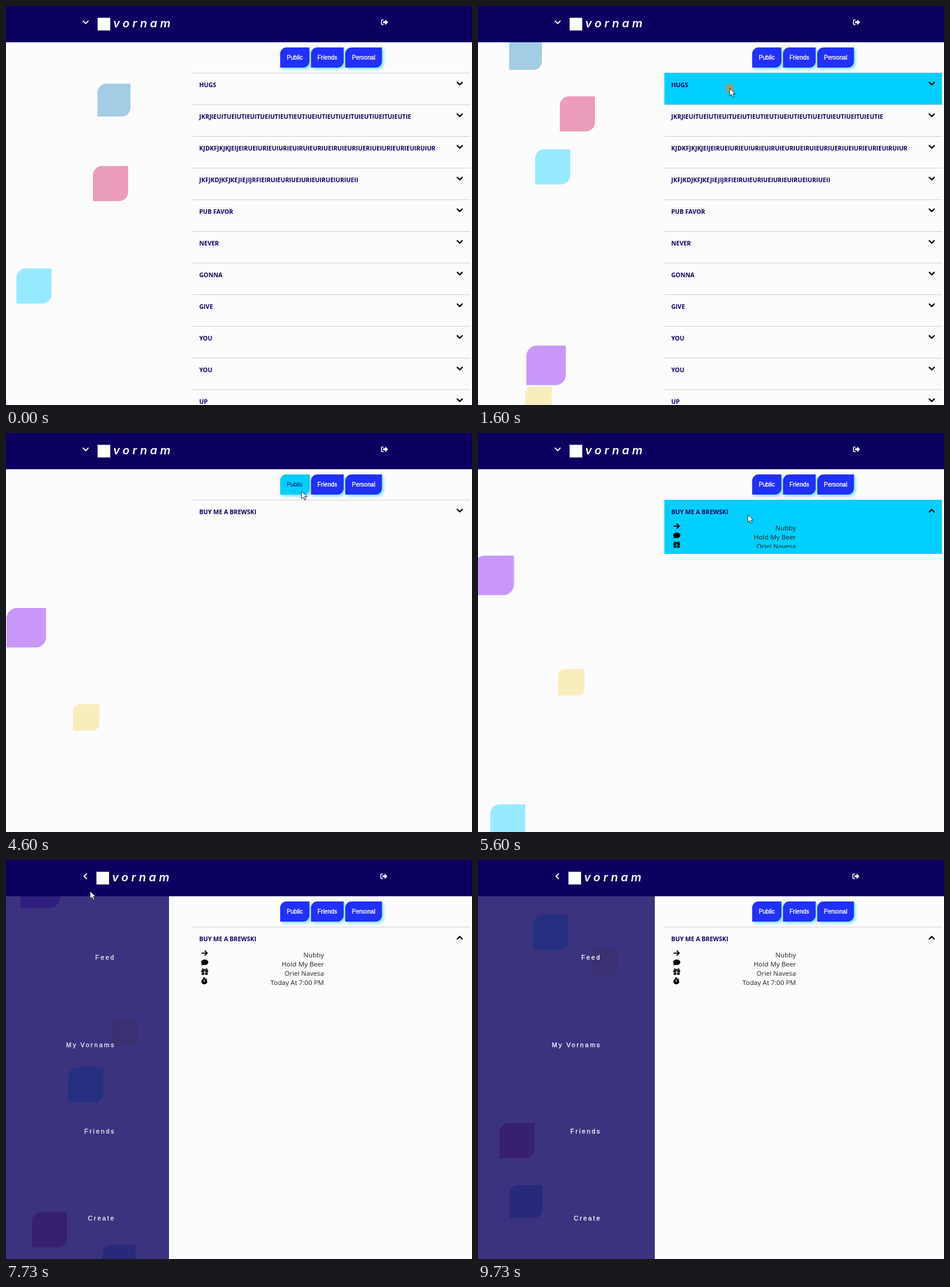
Animation of 809x693 px, one loop 9790 ms. Source, as an HTML page:

```html
<!DOCTYPE html>
<html lang="en">
<head>
<meta charset="utf-8">
<title>Favor feed</title>
<style>
html, body { margin: 0; width: 100%; height: 100%; overflow: hidden; background: #fcfcfc; }
svg { display: block; width: 809px; height: 693px; }
text { white-space: pre; }
.row text { font: 700 10.5px "Open Sans", "Noto Sans", sans-serif; fill: #0b0060; }
.row .line { fill: #cfcfcf; }
.chev { fill: none; stroke: #000; stroke-width: 2.2; stroke-linecap: round; stroke-linejoin: round; }
.white { stroke: #fff; stroke-width: 2; }
.info text { font: 11.6px "Open Sans", "Noto Sans", sans-serif; fill: #222; text-anchor: end; }
.btn text { font: 10.25px "Liberation Sans", Arial, sans-serif; fill: #fff; stroke: #fff; stroke-width: .35px; }
.btn { filter: drop-shadow(3px 3px 2px #7de4ff); }
.btn .hot text { fill: #0b0060; stroke: none; }
.nav text { font: 11px "Liberation Sans", Arial, sans-serif; letter-spacing: 2.45px; fill: #fff; stroke: #fff; stroke-width: .3px; text-anchor: end; }
.brand { font: italic 600 20px Inter, sans-serif; letter-spacing: 5px; fill: #fff; }
.hot { opacity: 0; }

[class*="t-"] { animation: 9.79s linear infinite; }
.t-blue { animation-name: blue; }
.t-pink { animation-name: pink; }
.t-cyan { animation-name: cyan; }
.t-violet { animation-name: violet; }
.t-sand { animation-name: sand; }
.t-hugs { animation-name: hugs; }
.t-public { animation-name: public; }
.t-friends { animation-name: friends; }
.t-drink { animation-name: drink; }
.t-info { animation-name: info; }
.t-menu { animation-name: menu; }
.t-fade { animation-name: fade; }
.t-pointer { animation-name: pointer; animation-timing-function: ease-in-out; }
.t-click { animation-name: click; }
.t-feed { animation-name: feed; }
.t-mine { animation-name: mine; }
.t-shut { animation-name: shut; }
.t-open { animation-name: open; }
.t-down { animation-name: down; }
.t-left { animation-name: left; }
.t-nudge { animation-name: nudge; }
.t-nudge1 { animation-name: nudge1; }

/* floating leaves */
@keyframes blue {
  0% { transform: translate(159px, 135px); }
  8% { transform: translate(104px, 95px); }
  16.34% { transform: translate(54px, 54px); }
  22% { transform: translate(56px, 26px); }
  30% { transform: translate(70px, -14px); }
  30.01%, 71.6% { transform: translate(205px, 705px); }
  78.96% { transform: translate(168px, 668px); }
  89% { transform: translate(108px, 617px); }
  99.39%, 100% { transform: translate(55px, 565px); }
}
@keyframes pink {
  0% { transform: translate(151px, 278px); }
  16.34% { transform: translate(142px, 157px); }
  29.93% { transform: translate(125px, 52px); }
  40% { transform: translate(105px, -25px); }
  40.01%, 66.8% { transform: translate(61px, 705px); }
  68.74% { transform: translate(57px, 690px); }
  78.96% { transform: translate(45px, 612px); }
  89% { transform: translate(38px, 535px); }
  99.39% { transform: translate(37px, 457px); }
  100% { transform: translate(37px, 452px); }
}
@keyframes cyan {
  0% { transform: translate(18px, 456px); }
  4% { transform: translate(13px, 405px); }
  10% { transform: translate(47px, 329px); }
  16.34% { transform: translate(99px, 249px); }
  22% { transform: translate(120px, 174px); }
  29.93% { transform: translate(126px, 69px); }
  40% { transform: translate(128px, -66px); }
  40.01%, 52.6% { transform: translate(20px, 705px); }
  60% { transform: translate(22px, 609px); }
  68.74% { transform: translate(46px, 495px); }
  78.96% { transform: translate(108px, 360px); }
  88% { transform: translate(120px, 243px); }
  99.39% { transform: translate(96px, 95px); }
  100% { transform: translate(95px, 87px); }
}
@keyframes violet {
  0%, 3.93% { transform: translate(120px, 705px); }
  16.34% { transform: translate(84px, 590px); }
  29.93% { transform: translate(42px, 464px); }
  40% { transform: translate(10px, 369px); }
  46.99% { transform: translate(1px, 304px); }
  58% { transform: translate(-7px, 206px); }
  68.74% { transform: translate(2px, 109px); }
  78.96% { transform: translate(25px, 15px); }
  85%, 100% { transform: translate(40px, -41px); }
}
@keyframes sand {
  0%, 9.2% { transform: translate(83px, 705px); }
  16.34% { transform: translate(82px, 661px); }
  29.93% { transform: translate(88px, 577px); }
  46.99% { transform: translate(116px, 471px); }
  68.74% { transform: translate(165px, 341px); }
  78.96% { transform: translate(183px, 277px); }
  99.39% { transform: translate(196px, 154px); }
  100% { transform: translate(196px, 150px); }
}

/* hover and list states */
@keyframes hugs { 0%, 9.5%, 21.5%, 100% { opacity: 0; } 10.5%, 20% { opacity: 1; } }
@keyframes public { 0%, 23%, 31.5%, 45%, 51%, 100% { opacity: 0; } 24%, 30.5%, 46.5%, 50% { opacity: 1; } }
@keyframes friends { 0%, 30.5%, 46%, 100% { opacity: 0; } 31.5%, 45% { opacity: 1; } }
@keyframes drink {
  0%, 50.5% { opacity: 0; height: 55px; }
  51.5%, 55.5% { opacity: 1; height: 55px; }
  58%, 60% { opacity: 1; height: 112px; }
  61%, 100% { opacity: 0; height: 112px; }
}
@keyframes info { 0%, 55.5% { clip-path: inset(0 0 100% 0); } 58%, 100% { clip-path: inset(0 0 0 0); } }
@keyframes feed { 0%, 36% { visibility: visible; } 36.01%, 100% { visibility: hidden; } }
@keyframes mine { 0%, 36% { visibility: hidden; } 36.01%, 100% { visibility: visible; } }
@keyframes shut { 0%, 55.5% { opacity: 1; } 55.51%, 100% { opacity: 0; } }
@keyframes open { 0%, 55.5% { opacity: 0; } 55.51%, 100% { opacity: 1; } }

/* side menu and header */
@keyframes menu {
  0% { transform: translate(-307px, 0); }
  75.6% { transform: translate(-307px, 0); animation-timing-function: ease; }
  80.7%, 100% { transform: translate(0, 0); }
}
@keyframes fade {
  0% { opacity: 0; }
  75.6% { opacity: 0; animation-timing-function: ease; }
  80.7%, 100% { opacity: 1; }
}
@keyframes down { 0%, 75.6% { opacity: 1; } 75.61%, 100% { opacity: 0; } }
@keyframes left { 0%, 75.6% { opacity: 0; } 75.61%, 100% { opacity: 1; } }
@keyframes nudge { 0%, 75.6% { transform: translate(0, 0); } 75.61%, 100% { transform: translate(-2px, 0); } }
@keyframes nudge1 { 0%, 75.6% { transform: translate(0, 0); } 75.61%, 100% { transform: translate(-1px, 0); } }

/* pointer */
@keyframes pointer {
  0%, 6% { transform: translate(500px, 700px); }
  12% { transform: translate(440px, 150px); }
  16.34%, 18% { transform: translate(437px, 143px); }
  24% { transform: translate(505px, 92px); }
  27% { transform: translate(508px, 92px); }
  29.93% { transform: translate(544px, 88px); }
  33% { transform: translate(556px, 92px); }
  41% { transform: translate(558px, 95px); }
  46.99% { transform: translate(513px, 101px); }
  52% { transform: translate(470px, 140px); }
  59% { transform: translate(468px, 142px); }
  62% { transform: translate(440px, 110px); }
  68.74% { transform: translate(142px, 38px); }
  71%, 76% { transform: translate(138px, 30px); }
  78.96% { transform: translate(146px, 54px); }
  82% { transform: translate(140px, 90px); }
  88%, 100% { transform: translate(30px, 705px); }
}
@keyframes click {
  0%, 15.7%, 17.4%, 25.4%, 26.6%, 35%, 36.2%, 54.6%, 55.8%, 74.4%, 75.7%, 100% { opacity: 0; }
  15.71%, 17.39%, 25.41%, 26.59%, 35.01%, 36.19%, 54.61%, 55.79%, 74.41%, 75.69% { opacity: 1; }
}
</style>
</head>
<body>
<svg viewBox="0 0 809 693">
  <g id="leaves"></g>
  <g id="feed" class="t-feed"></g>

  <g class="t-mine">
    <g id="mine"></g>
    <path class="chev t-shut" d="M783.4 132.6l4.3 4.3 4.3-4.3"/>
    <path class="chev t-open" d="M783.4 137.2l4.3-4.3 4.3 4.3"/>
    <g class="info t-info">
      <path d="M339.5 161.7h9.5M344.8 157.2l4.5 4.5-4.5 4.5" fill="none" stroke="#000" stroke-width="1.9"/>
      <path d="M345 173c3.6 0 6.2 2.1 6.2 4.7s-2.6 4.7-6.2 4.7c-1 0-2-.2-2.8-.5-.8.7-2 1.2-3.4 1.2.7-.8 1.1-1.6 1.2-2.4-.8-.8-1.2-1.8-1.2-3 0-2.6 2.6-4.7 6.2-4.7z"/>
      <path d="M339 191.5h5.3v3.2h-5.3zM345.7 191.5h5.3v3.2h-5.3zM339.8 195.6h4.5v4h-4.5zM345.7 195.6h4.5v4h-4.5z"/>
      <path d="M345 191.3c-1-2.6-4.3-3-4.3-1.2 0 1 1.8 1.2 4.3 1.2 2.5 0 4.3-.2 4.3-1.2 0-1.8-3.3-1.4-4.3 1.2z" fill="none" stroke="#000" stroke-width="1.3"/>
      <path d="M342.3 204h4v1.6h-4zM343.5 205h1.6v2h-1.6zM347.3 206.7l1-1 1 1-1 1z"/>
      <circle cx="344.3" cy="211" r="5.1"/>
      <path d="M344.3 208v3.5" stroke="#fcfcfc" stroke-width="1.4"/>
      <text x="552" y="168.5">Nubby</text>
      <text x="552" y="184.5">Hold My Beer</text>
      <text x="552" y="200.5">Oriel Navesa</text>
      <text x="552" y="216.5">Today At 7:00 PM</text>
    </g>
  </g>

  <g id="buttons"></g>

  <g class="t-menu">
    <path d="M0 63h307v630H0z" fill="#0b0060" fill-opacity=".8"/>
    <g class="nav t-fade">
      <text x="214" y="173">Feed</text>
      <text x="214" y="324.5">My Vornams</text>
      <text x="214" y="474.5">Friends</text>
      <text x="214" y="626">Create</text>
    </g>
  </g>

  <path d="M0 0h809v63H0z" fill="#0b0060"/>
  <path class="chev white t-down" d="M134 26.3l4.3 4.3 4.3-4.3"/>
  <path class="chev white t-left" d="M139.8 24l-4.3 4.3 4.3 4.3"/>
  <g class="t-nudge">
    <path d="M159 20.5h22v22h-22z" fill="#fff"/>
    <text class="brand" x="186" y="37">vornam</text>
  </g>
  <g class="t-nudge1">
    <path d="M655.5 24.2h-2.2q-1.5 0-1.5 1.5v5.2q0 1.5 1.5 1.5h2.2" fill="none" stroke="#fff" stroke-width="1.6"/>
    <path d="M654.7 26.5h3.6v-3.1l5 4.9-5 4.9v-3.1h-3.6z" fill="#fff"/>
  </g>

  <g class="t-pointer">
    <circle class="t-click" r="8" fill="#be9650" fill-opacity=".75"/>
    <path d="M0 0v13.3l3.1-2.9 2.2 5 2.3-1-2.2-4.9h4.2z" fill="#fff" stroke="#111" stroke-width=".9"/>
  </g>
</svg>
<script>
const put = (id, html) => { document.getElementById(id).innerHTML = html; };

// box with rounded top-left and bottom-right corners
const leaf = (x, y, w, h, r) =>
  `M${x + r} ${y}h${w - r}v${h - r}a${r} ${r} 0 0 1 ${-r} ${r}h${r - w}v${r - h}a${r} ${r} 0 0 1 ${r} ${-r}z`;

const leaves = [
  ["pink", 61, "211,13,88"],
  ["cyan", 61, "0,207,255"],
  ["blue", 57, "31,133,196"],
  ["violet", 68.5, "123,0,243"],
  ["sand", 46, "248,216,96"]
];
put("leaves", leaves.map(([name, size, rgb]) =>
  `<path class="t-${name}" d="${leaf(0, 0, size, size, size * .26)}" fill="rgba(${rgb},.4)"/>`).join(""));

const row = (label, i, hover, chevron) => {
  const y = 116 + 55 * i;
  return `<g class="row"><rect class="line" x="324" y="${y}" width="482" height="1"/>` +
    (hover ? `<rect class="hot t-${hover}" x="323.5" y="${y}" width="482" height="55" fill="#00cfff"/>` : "") +
    `<text x="335.5" y="${y + 24.5}">${label}</text>` +
    (chevron ? `<path class="chev" d="M783.4 ${y + 16.6}l4.3 4.3 4.3-4.3"/>` : "") + "</g>";
};
const feed = [
  "HUGS",
  "JKRJIEUITUEIUTIEUITUEIUTIEUTIEUTIUEIUTIEUTIUEITUIEUTIUEITUIEUTIE",
  "KJDKFJKJKJEIJEIRUEIURIEUIURIEUIRUIEURIUEIRUIEURIUERIUEIURIEURIEUIRUIUR",
  "JKFJKDJKFJKEJIEJIJRFIEIRUIEURIUEIURIEUIRUEIURIUEII",
  "PUB FAVOR", "NEVER", "GONNA", "GIVE", "YOU", "YOU", "UP"
];
put("feed", feed.map((label, i) => row(label, i, i ? "" : "hugs", true)).join(""));
put("mine", row("BUY ME A BREWSKI", 0, "drink", false));

const button = (label, x, w, hover) => {
  const face = fill => `<path d="${leaf(x, 72, w, 35, 11)}" fill="${fill}"/>` +
    `<text x="${x + w / 2}" y="93.3" text-anchor="middle">${label}</text>`;
  return `<g class="btn">${face("#2130fa")}` +
    (hover ? `<g class="hot t-${hover}">${face("#00cfff")}</g>` : "") + "</g>";
};
put("buttons", button("Public", 476, 50.7, "public") +
  button("Friends", 529.5, 56.7, "friends") + button("Personal", 589, 63.7));
</script>
</body>
</html>
```
